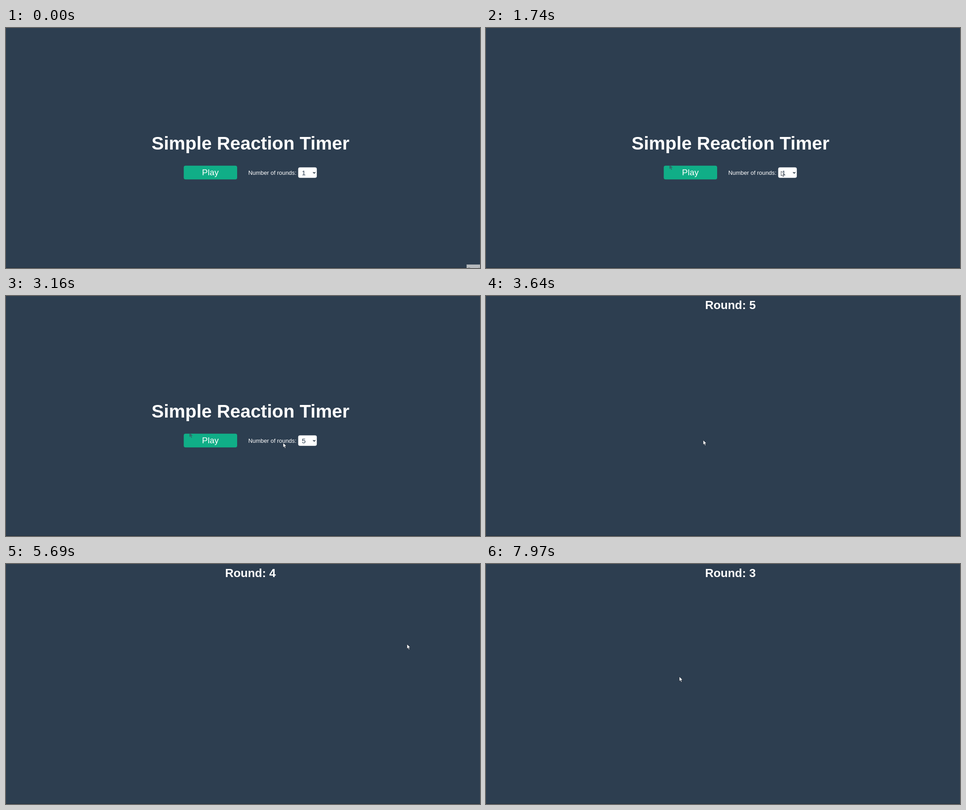
An HTML page for the animation above (8 s loop, 1052x533 px).

```html
<!DOCTYPE html>
<html lang="en">
<head>
<meta charset="utf-8">
<title>Simple Reaction Timer</title>
<style>
  html, body { margin: 0; width: 100%; height: 100%; overflow: hidden; background: #2d3e50; }
  svg { display: block; width: 100vw; height: 100vh; font-family: "Liberation Sans", Arial, sans-serif; }
  .white { fill: #fff; }
  .ink { fill: #2d3e50; }
  .bold { font-weight: bold; }
  .middle { text-anchor: middle; }
  .option { font-size: 15.5px; }
</style>
</head>
<body>
<svg viewBox="0 0 1052 533" preserveAspectRatio="none">
  <defs>
    <path id="pointer" d="M0 0V10.5L2.4 8.3L4.1 12.2L5.9 11.4L4.3 7.6H7.6Z"/>
    <path id="fingers" d="M4 3L-6 -3M3 1L-5 -6M4 0L-1 -7.5M2 5L-5.5 0.5M6.5 3V-5"/>
    <filter id="shade" x="-20%" y="-10%" width="140%" height="125%">
      <feDropShadow dx="0" dy="2" stdDeviation="2" flood-opacity=".45"/>
    </filter>
    <linearGradient id="pressed" x2="0" y2="1">
      <stop offset=".45" stop-color="#fff"/>
      <stop offset="1" stop-color="#e4e6e8"/>
    </linearGradient>
  </defs>
  <rect width="1052" height="533" fill="#2d3e50"/>
  <rect y="532" width="1052" height="1" fill="#222f3c"/>

  <g id="menu">
    <text class="white bold middle" x="542.5" y="270" font-size="40.8">Simple Reaction Timer</text>
    <rect x="394.5" y="305.7" width="118.5" height="30.5" rx="4" fill="#10ae87"/>
    <path id="trail" d="M407 306V313.5L409.4 311.3L411.1 315.2L412.9 314.4L411.3 310.6H414.6L410 306Z" fill="#2d6f6c"/>
    <text class="white middle" x="453.6" y="327" font-size="19">Play</text>
    <text class="white" x="537.8" y="325.5" font-size="12.9">Number of rounds:</text>
    <rect id="select" x="648.5" y="309.4" width="41.3" height="23.4" rx="4" fill="#fff"/>
    <text id="value" class="ink option" x="656.4" y="327"></text>
    <path d="M681.5 320L684 322.6L686.5 320" fill="none" stroke="#1d2c3b" stroke-width="1.5"/>
    <g id="list">
      <rect x="649" y="333.3" width="40.5" height="133.4" fill="#fff" stroke="#9aa3ab" stroke-width=".6" filter="url(#shade)"/>
      <rect id="mark" x="649" width="40.5" height="19" fill="#1e90ff"/>
    </g>
  </g>

  <text id="round" class="white bold middle" x="542.5" y="29" font-size="26"></text>

  <g id="tile">
    <rect width="102" height="102" rx="16" fill="#10ae87"/>
    <g transform="translate(51.5 52)" fill="none" stroke-linecap="round" stroke-linejoin="round">
      <path d="M-10 4Q-9 10 -3.5 10.5M-8.5 5Q-7.5 8 -5 8.5M0 -10Q5.5 -11 6.5 -7" stroke="#000" stroke-width="1.8"/>
      <g stroke="#000" stroke-width="6.2">
        <use href="#fingers"/>
        <circle cx="3.5" cy="4" r="4.6"/>
      </g>
      <g stroke="#ffc83d" stroke-width="3">
        <use href="#fingers"/>
        <circle cx="3.5" cy="4" r="4.6" fill="#ffc83d"/>
      </g>
      <path d="M-4.5 -2.2L1.5 1.6M-3.4 -5L2.6 -.8" stroke="#d98f1f" stroke-width=".7"/>
    </g>
  </g>

  <g id="tip">
    <rect x="1022.5" y="525.5" width="32" height="12" fill="#b7bbbf" stroke="#8e959c"/>
    <text x="1025" y="536.5" font-size="8" fill="#4a4f55">Record</text>
  </g>

  <g id="cursor">
    <use id="arrow" href="#pointer" fill="#fff" stroke="#1c2530" stroke-width=".8"/>
    <path id="hand" fill="#fff" stroke="#1c2530" stroke-width=".8" stroke-linejoin="round"
      d="M-1.4 9V1Q-1.2 0 0 0Q1.2 0 1.4 1V5Q3.4 4.4 3.7 5.8Q5.4 5.2 5.7 6.6Q7 6.4 7 7.8V10.5Q7 12 5.8 15H-.6Q-1.4 12.6 -3.8 9.6Q-4.2 8 -2.8 8Z"/>
  </g>
</svg>
<script>
const LOOP = 8000, ROUNDS = 5;
const OPEN = 1940, PICK = 2820, START = 3640;
const ROW = 19, LIST_TOP = 333.6;

const el = id => document.getElementById(id);
const show = (id, on) => el(id).setAttribute("display", on ? "inline" : "none");
const place = (id, x, y) => el(id).setAttribute("transform", `translate(${x} ${y})`);
const inside = (x, y, left, top, w, h) => x >= left && x <= left + w && y >= top && y <= top + h;
const clamp = (v, lo, hi) => Math.min(hi, Math.max(lo, v));
const ease = k => (1 - Math.cos(Math.PI * k)) / 2;

const move = (from, to, x, y) => ({ from, to, x, y });
const home = { x: 1030, y: 512 };
const moves = [
  // to the button, then the select
  move(70, 620, 405, 298),
  move(620, 800, 434, 315),
  move(1400, 1740, 655, 318),
  // down the list and back to the button
  move(1900, 2610, 670, 370),
  move(2740, 2780, 667, 378),
  move(2840, 3090, 615, 326),
  move(3160, 3570, 482, 320),
  // first tile and away
  move(5090, 5530, 890, 178),
  move(5750, 5930, 366, 263),
  move(5930, 6430, 402, 249),
  // second tile and away
  move(7090, 7290, 525, 516),
  move(7360, 7500, 503, 479),
  move(7770, 7970, 429, 250)
];

const tiles = [
  { from: 4830, to: 5620, x: 870, y: 121 },
  { from: 6830, to: 7570, x: 470, y: 444 }
];

const labels = [1, 3, 5, 10, 15, 20, 30].map((n, i) => {
  const label = el("value").cloneNode();
  label.removeAttribute("id");
  label.textContent = n;
  label.setAttribute("y", LIST_TOP + ROW * i + 14.6);
  el("list").append(label);
  return label;
});

function pointerAt(t) {
  return moves.reduce((p, m) => {
    const k = ease(clamp((t - m.from) / (m.to - m.from), 0, 1));
    return { x: p.x + (m.x - p.x) * k, y: p.y + (m.y - p.y) * k };
  }, home);
}

function draw(t) {
  const { x, y } = pointerAt(t);
  const menu = t < START, open = t >= OPEN && t < PICK;
  const tile = tiles.find(s => t >= s.from && t < s.to);

  show("tip", t < 70);
  show("menu", menu);
  show("trail", t >= 740);
  show("list", open);
  el("select").setAttribute("fill", open ? "url(#pressed)" : "#fff");
  el("value").textContent = t < PICK ? 1 : ROUNDS;

  const row = clamp(Math.floor((y - LIST_TOP) / ROW), 0, labels.length - 1);
  el("mark").setAttribute("y", LIST_TOP + ROW * row);
  labels.forEach((label, i) => label.setAttribute("class", `option ${i === row ? "white" : "ink"}`));

  show("round", !menu);
  el("round").textContent = "Round: " + (ROUNDS - tiles.filter(s => t >= s.to).length);
  show("tile", tile);
  if (tile) place("tile", tile.x, tile.y);

  const hover = menu ? inside(x, y, 394, 306, 119, 30) : tile && inside(x, y, tile.x, tile.y, 102, 102);
  show("cursor", t >= 70);
  show("hand", hover);
  show("arrow", !hover);
  place("cursor", x, y);
}

function tick() {
  draw(performance.now() % LOOP);
  requestAnimationFrame(tick);
}
tick();
</script>
</body>
</html>
```
